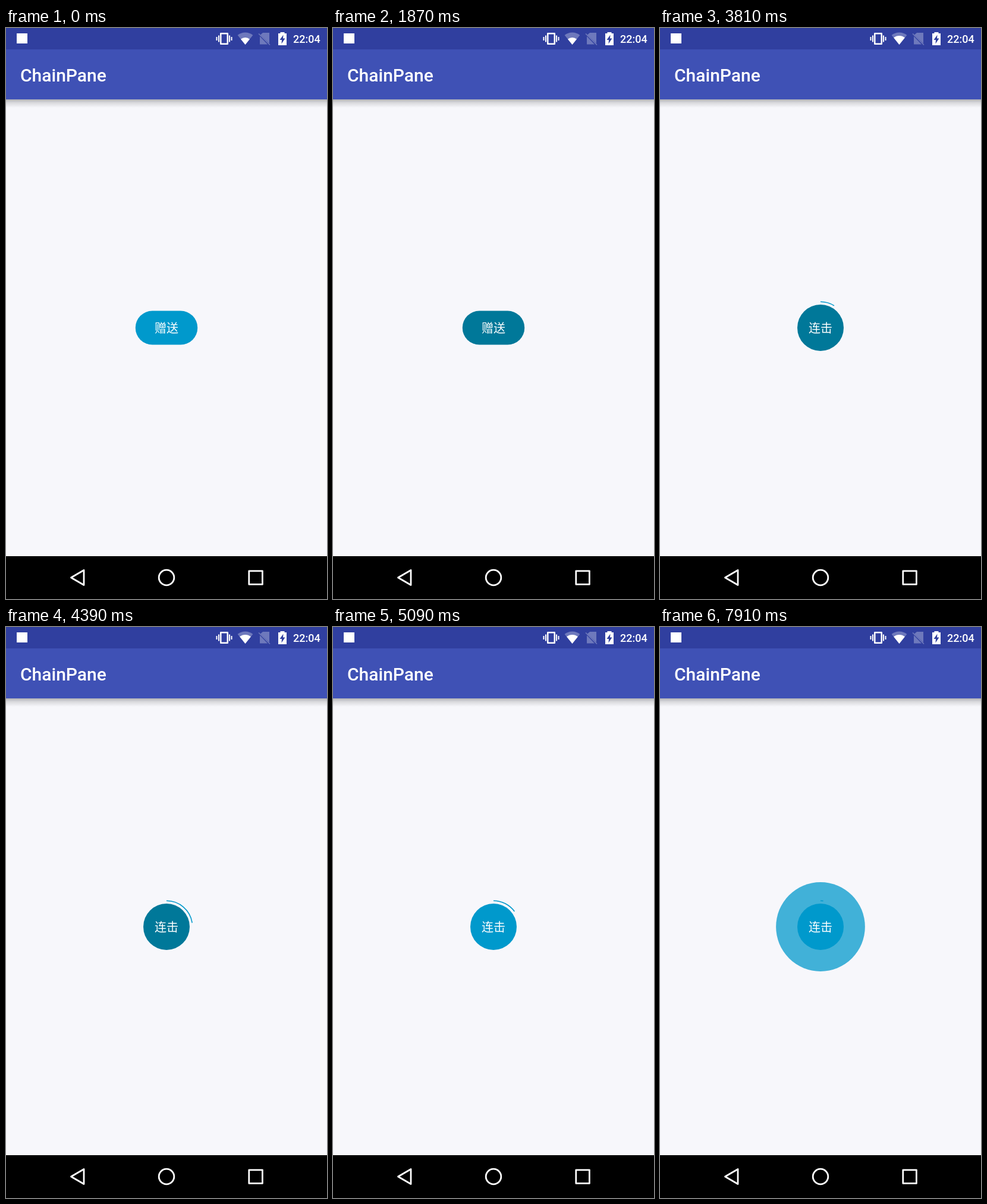
Recreate the animation shown at these times as an HTML page with a canvas. Size 540 px wide and 960 px high, loop 8000 ms.

```html
<!DOCTYPE html>
<html lang="zh-CN">
<head>
<meta charset="utf-8">
<title>ChainPane</title>
<style>
html, body { margin: 0; width: 100%; height: 100%; overflow: hidden; background: #f7f7fb; }
canvas { display: block; width: 540px; height: 960px; }
</style>
</head>
<body>
<canvas id="stage" width="540" height="960"></canvas>
<script>
const ctx = document.getElementById('stage').getContext('2d');

const LOOP = 8000;
const CX = 270, CY = 504;
const BLUE = '#0099cc', BLUE_DOWN = '#007899';
const PAGE = '#f7f7fb', WHITE = '#fff', DIM = 'rgba(255,255,255,.3)';
const HEADER = '#3f51b5', STATUS = '#303f9f';

// Touches as [down, up] times.
const TOUCHES = [[1430, 2100], [3795, 4460], [7320, 7840]];
const MORPH_START = 2100, MORPH_TIME = 400;
const COMBO_START = 3440;
const RIPPLE_TIME = 500, RIPPLE_MAX = 175;
const DEGREES_PER_MS = 0.0855;
const WIFI_RISE = 2000;

const clamp = x => Math.max(0, Math.min(1, x));
const mix = (a, b, k) => a + (b - a) * k;
const easeInOut = x => 0.5 - Math.cos(Math.PI * x) / 2;
const easeOut = x => 1 - (1 - x) ** 2;

function polygon(color, ...points) {
  ctx.fillStyle = color;
  ctx.beginPath();
  points.forEach(([x, y]) => ctx.lineTo(x, y));
  ctx.closePath();
  ctx.fill();
}

function rect(color, x, y, w, h) {
  ctx.fillStyle = color;
  ctx.fillRect(x, y, w, h);
}

function disc(color, r) {
  ctx.fillStyle = color;
  ctx.beginPath();
  ctx.arc(CX, CY, r, 0, Math.PI * 2);
  ctx.fill();
}

function text(str, x, y, font, align = 'left') {
  ctx.font = font;
  ctx.fillStyle = WHITE;
  ctx.textAlign = align;
  ctx.fillText(str, x, y);
}

function wifiFan(color, r) {
  const half = 0.68;
  ctx.fillStyle = color;
  ctx.beginPath();
  ctx.moveTo(402.5, 28);
  ctx.arc(402.5, 28, r, -Math.PI / 2 - half, -Math.PI / 2 + half);
  ctx.fill();
}

function drawStatusBar(t) {
  rect(STATUS, 0, 0, 540, 36);
  rect(WHITE, 18, 9, 18, 17);

  // vibrate
  ctx.strokeStyle = WHITE;
  ctx.lineWidth = 2.5;
  ctx.strokeRect(361.25, 9.25, 11.5, 17.5);
  for (const side of [-1, 1]) {
    rect(WHITE, 366 + side * 9, 12.5, 2, 11);
    rect(WHITE, 366 + side * 12.5, 15, 2, 6);
  }

  wifiFan(DIM, 20.5);
  wifiFan(WHITE, t < WIFI_RISE ? 12 : 15);

  // no SIM
  polygon(DIM, [432, 8], [443, 8], [443, 26], [428, 11.5]);
  polygon(DIM, [427, 14], [440, 27.5], [427, 27.5]);
  ctx.strokeStyle = DIM;
  ctx.lineWidth = 1.6;
  ctx.beginPath();
  ctx.moveTo(425, 9.5);
  ctx.lineTo(444, 28.5);
  ctx.stroke();

  // battery
  rect(WHITE, 461.5, 7, 7, 3);
  rect(WHITE, 458, 9, 14, 20);
  polygon(STATUS, [466.5, 11.5], [460.5, 20], [464, 20], [463.5, 26.5], [469.5, 17.5], [466, 17.5]);

  text('22:04', 483, 25, '500 18px Roboto, sans-serif');
}

function drawHeader() {
  rect(HEADER, 0, 36, 540, 84);
  text('ChainPane', 24, 90, '500 30px Roboto, sans-serif');
  const shade = ctx.createLinearGradient(0, 120, 0, 134);
  shade.addColorStop(0, 'rgba(0,0,0,.28)');
  shade.addColorStop(0.4, 'rgba(0,0,0,.12)');
  shade.addColorStop(1, 'rgba(0,0,0,0)');
  rect(shade, 0, 120, 540, 14);
}

function drawNavBar() {
  rect('#000', 0, 888, 540, 72);
  ctx.strokeStyle = WHITE;
  ctx.lineWidth = 2.8;
  ctx.lineJoin = 'round';
  ctx.beginPath();
  ctx.moveTo(131, 911.5);
  ctx.lineTo(131, 936.5);
  ctx.lineTo(109.5, 924);
  ctx.closePath();
  ctx.stroke();
  ctx.beginPath();
  ctx.arc(270, 924, 12.8, 0, Math.PI * 2);
  ctx.stroke();
  ctx.strokeRect(408.8, 912.8, 22.6, 22.6);
}

function drawSendButton(t, color) {
  const k = easeInOut(clamp((t - MORPH_START) / MORPH_TIME));
  const w = mix(104.5, 79, k), h = mix(57, 78, k);
  ctx.fillStyle = color;
  ctx.beginPath();
  ctx.roundRect(CX - w / 2, CY - h / 2, w, h, Math.min(w, h) / 2);
  ctx.fill();
}

function drawCombo(t, color) {
  // Every tap on the circle restarts the ring and sends out a ripple.
  const taps = TOUCHES.slice(1).map(touch => touch[1]).filter(up => up <= t);
  const start = taps.length ? taps[taps.length - 1] : COMBO_START;
  const x = (t - start) / RIPPLE_TIME;
  if (taps.length && x < 1) {
    const k = easeOut(x);
    ctx.globalAlpha = 1 - k;
    disc(BLUE, mix(39, RIPPLE_MAX, k));
    ctx.globalAlpha = 1;
  }

  const sweep = (t - start) * DEGREES_PER_MS * Math.PI / 180;
  ctx.strokeStyle = BLUE;
  ctx.lineWidth = 1.6;
  ctx.beginPath();
  ctx.arc(CX, CY, 43.7, -Math.PI / 2, -Math.PI / 2 + sweep);
  ctx.stroke();
  disc(color, 39);
}

function draw(t) {
  rect(PAGE, 0, 0, 540, 960);
  drawHeader();
  drawStatusBar(t);
  drawNavBar();

  const down = TOUCHES.some(([from, to]) => t >= from && t < to);
  const color = down ? BLUE_DOWN : BLUE;
  const combo = t >= COMBO_START;
  (combo ? drawCombo : drawSendButton)(t, color);
  text(combo ? '连击' : '赠送', CX, 512, '20px "Noto Sans CJK SC", "Noto Sans CJK", sans-serif', 'center');
}

function tick(now) {
  draw(now % LOOP);
  requestAnimationFrame(tick);
}
draw(0);
requestAnimationFrame(tick);
</script>
</body>
</html>
```
